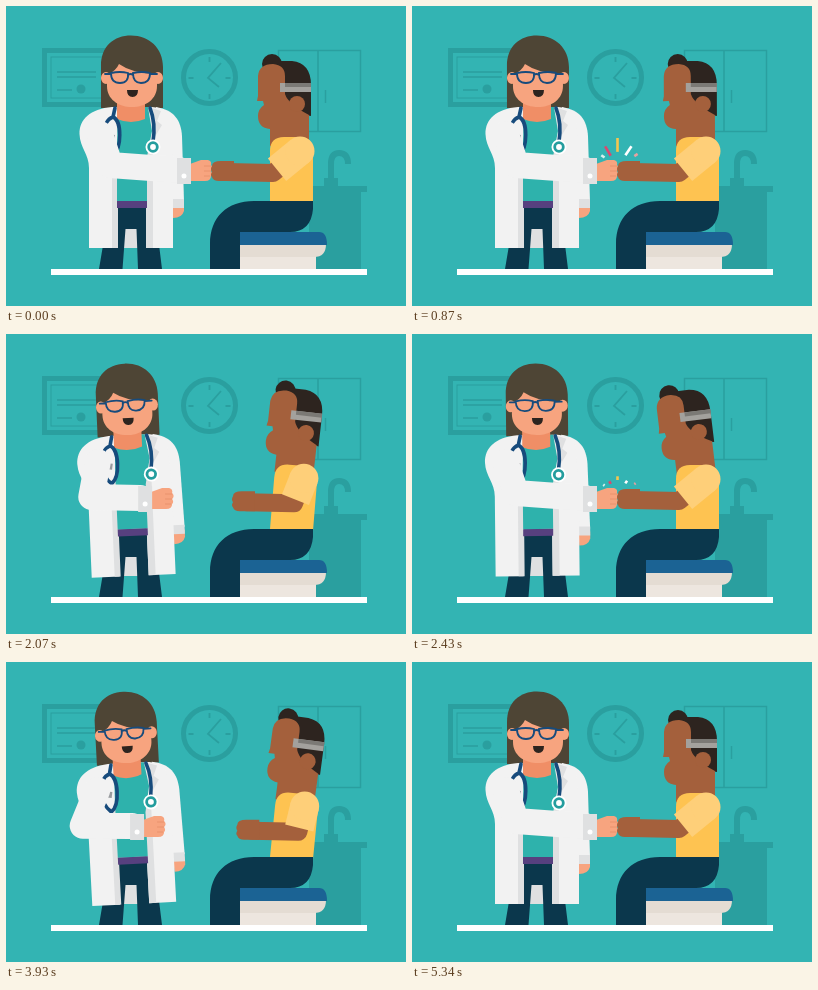
Write an HTML page that moves like this. It is 400 by 300 pixels and loops after 5.4 s.

```html
<!DOCTYPE html>
<html lang="en">
<head>
<meta charset="utf-8">
<title>Fist bump</title>
<style>
html, body { margin: 0; width: 100%; height: 100%; overflow: hidden; background: #33b4b3; }
svg { display: block; width: 100%; height: 100%; }
.line { fill: none; stroke: #2a9f9f; }
.wall { fill: #2a9f9f; }
.coat { fill: #f2f2f2; }
.shade { fill: #dfe0e1; }
.hair { fill: #4e4535; }
.peach { fill: #f7a47f; }
.navy { fill: #0b374c; }
.tube { fill: none; stroke: #174b7c; stroke-linecap: round; }
.brown { fill: #a4603c; }
.dark { fill: #2d241f; }
.limb { fill: none; stroke-linecap: round; stroke-linejoin: round; }
.cut { stroke-linecap: butt; }
</style>
</head>
<body>
<svg viewBox="0 0 400 300">
  <rect width="400" height="300" fill="#33b4b3"/>

  <!-- wall and counter -->
  <g class="line">
    <rect x="38.500" y="44.500" width="65" height="54" stroke-width="5"/>
    <rect x="45" y="51" width="52" height="41" stroke-width="1"/>
    <path d="M51 66H90M51 71H90M51 84H66" stroke-width="1.500"/>
    <circle cx="203.500" cy="71.500" r="26" stroke-width="5"/>
    <path d="M203.500 51v5M203.500 88v5M182.500 72h5M219.500 72h5M215 57L202 72L213 81" stroke-width="1.800"/>
    <path d="M272.500 44.500H354.500V125.500H272.500zM312 44V126M319.500 84v13" stroke-width="1.500"/>
    <path d="M325 180V158Q325 147 333 147Q342 147 342 158" stroke-width="6"/>
  </g>
  <g class="wall">
    <circle cx="75" cy="83" r="4.500"/>
    <path d="M303 180H361V186H355V263H303zM318 172h14v9h-14z"/>
  </g>

  <!-- doctor -->
  <path class="shade" d="M106 215H150V242H106z"/>
  <path class="navy" d="M104 198H148L156 263H132L130.500 223H119.500L116.500 263H93z"/>
  <g id="doctor">
    <path class="hair" d="M95 102V60C95 40 108 29.500 125 29.500C143 29.500 157 42 157 61V102z"/>
    <path class="peach" d="M166 198H178V205Q176 212 167 212z"/>
    <path class="coat" d="M150 101C168 104 175 114 176 130L178 195H162L150 150z"/>
    <path class="shade" d="M166 193H178V202H166z"/>
    <path class="coat" d="M106 101C84 103 73.500 113 73.500 128C74 142 83 148 83 162V242H111V195H140V242H167V150L164 112Q158 101 146 101z"/>
    <path class="shade" d="M106 145H112V242H106zM140 145H147V242H140zM143 101L155 105L151 115L156 119L147 134z"/>
    <path fill="#2eb2ac" d="M112 101H142L146 125L141 151V195H111V140z"/>
    <path fill="#57407f" d="M111 195H141V202H111z"/>
    <path fill="#f08e66" d="M111 92H139V113Q125 119 111 113z"/>
    <g id="doctorHead">
      <ellipse class="peach" cx="100" cy="72" rx="5" ry="6"/>
      <ellipse class="peach" cx="152" cy="72" rx="5" ry="6"/>
      <path class="peach" d="M101 69Q110 65 113 58Q127 68 151 68V80C151 93 140 101 126 101C112 101 101 93 101 80z"/>
      <path class="tube" stroke-width="1.800" d="M99 68H105M144 68H151M122 69Q124.500 67 127 69M105 67Q114 65 122 67Q123 77 114 77Q105 77 105 67zM127 67Q136 65 144 67Q144 77 135 77Q127 77 127 67z"/>
      <path class="dark" d="M121 84H132Q132 91 126.500 91Q121 91 121 84z"/>
    </g>
    <path class="tube" stroke-width="3.600" d="M109 102L107 111M107 111C95 115 95 139 107 149C116 142 116 115 107 111M144 102Q150 117 147 136"/>
    <path d="M101 128L109 129L108 135L101 134z" fill="#989b9e"/>
    <circle cx="147" cy="141" r="7.500" fill="#fff"/>
    <circle cx="147" cy="141" r="4.300" fill="#fff" stroke="#249d9e" stroke-width="2.800"/>
  </g>
  <path id="doctorArm" class="limb" stroke="#f2f2f2" stroke-width="26"/>
  <g id="doctorFist">
    <path class="peach" d="M184 158L195 154H202Q206 155 205 159Q208 162 205 165Q207 168 205 170Q205 175 199 175H184z"/>
    <path d="M198 160h7M198 165h7M198 170h6" stroke="#e48d69" stroke-width=".8"/>
    <path class="shade" d="M171 152H185V178H171z"/>
    <circle cx="178" cy="170" r="2.500" fill="#fff"/>
  </g>

  <!-- stool and patient -->
  <path fill="#ede6df" d="M234 250H310V263H234z"/>
  <path fill="#e4dcd3" d="M234 238H320Q320 251 308 251H234z"/>
  <path fill="#1b6394" d="M234 226H313Q321 226 321 239H234z"/>
  <g id="patient">
    <g id="patientHead">
      <circle class="dark" cx="266" cy="58" r="10"/>
      <path class="dark" d="M266 55H286Q305 57 305 79V110L290 107H276z"/>
      <path class="brown" d="M252 70Q253 58 267 58Q279 59 279 70V88Q282 98 303 109V140H264V123Q252 122 252 110Q252 103 258 99L257 95H251L252 90z"/>
      <circle class="brown" cx="291" cy="98" r="8"/>
      <path d="M274 77H305V86H274z" fill="#a3a19d"/>
      <path d="M279 77H305V81H279z" fill="#7b7975"/>
    </g>
    <path fill="#fec351" d="M264 200V145Q264 131 278 131H294Q307 131 307 145V200z"/>
  </g>
  <path class="navy" d="M307 195V203Q305 226 284 226H234V263H204V238C204 211 221 195 248 195z"/>
  <path id="patientArm" class="limb" stroke="#a4603c" stroke-width="18"/>
  <path id="sleeve" class="limb cut" stroke="#fecf79" stroke-width="29"/>
  <circle id="shoulder" r="14.500" fill="#fecf79"/>
  <path id="patientFist" class="brown" d="M228 155H215Q206 155 206 160Q204 163 206 166Q204 169 206 171Q207 175 213 175H228z"/>

  <path fill="#fff" d="M45 263H361V269H45z"/>
  <g id="sparks" class="limb cut" stroke-width="2.600"></g>
</svg>
<script>
const CYCLE = 1800;
const el = id => document.getElementById(id);
const set = (id, name, value) => el(id).setAttribute(name, value);
const smooth = u => u * u * (3 - 2 * u);
const mix = (a, b, u) => a + (b - a) * u;
const clamp = u => Math.max(0, Math.min(1, u));

// Eased value through [time, value] keys.
function track(keys, t) {
  for (let i = 1; i < keys.length; i++) {
    const [t0, a] = keys[i - 1], [t1, b] = keys[i];
    if (t < t1) return mix(a, b, smooth((t - t0) / (t1 - t0)));
  }
  return keys[keys.length - 1][1];
}

// Wind up slowly, then punch with acceleration.
function pullBack(t) {
  if (t < 390) return smooth(t / 390);
  return t < 600 ? 1 - ((t - 390) / 210) ** 3 : 0;
}

// Angle from vertical, inner and outer radius, colour.
const rays = [
  [-54, 17, 20, '#d9efed'],
  [-31, 14, 24, '#d84a70'],
  [0, 16, 29, '#f5c64e'],
  [34, 15, 25, '#ffffff'],
  [57, 21, 24, '#e6a2a0']
];
const sparkLines = rays.map(ray => {
  const path = document.createElementNS('http://www.w3.org/2000/svg', 'path');
  path.setAttribute('stroke', ray[3]);
  el('sparks').append(path);
  return path;
});

function drawSparks(t) {
  const u = (t - 600) / 510;
  el('sparks').style.display = u > 0 && u < 1 ? '' : 'none';
  const head = 1 - (1 - clamp(u / .55)) ** 2;
  const tail = smooth(clamp((u - .5) / .5));
  rays.forEach(([degrees, inner, outer], i) => {
    const angle = degrees * Math.PI / 180;
    const point = r => `${205.5 + r * Math.sin(angle)} ${161 - r * Math.cos(angle)}`;
    const far = mix(inner, outer, head);
    const near = mix(inner - 1, far, tail);
    sparkLines[i].setAttribute('d', `M${point(near)}L${point(far)}`);
  });
}

function draw(now) {
  const t = now % CYCLE;
  const pull = pullBack(t);
  const lean = track([[0, 0], [390, -3.2], [630, -.6], [900, 0]], t);
  const nod = track([[0, 0], [360, 2], [615, -7], [900, 0]], t);

  set('doctor', 'transform', `rotate(${lean} 125 180)`);
  set('doctorHead', 'transform', `rotate(${lean * .3} 125 100)`);
  const back = 50 * pull;
  set('doctorArm', 'd', `M${94 + lean * .9} 128L${104 - 31 * pull * pull} ${159 + 5 * pull}L${173 - back} 164`);
  set('doctorFist', 'transform', `translate(${-back})`);

  set('patient', 'transform', `rotate(${pull * 6} 285 196)`);
  set('patientHead', 'transform', `rotate(${nod} 288 132)`);
  const away = 27 * pull;
  const drop = 3 * pull;
  const shoulder = [294 + pull * 5, 145 - pull];
  const elbow = [267 + away, 167 + drop];
  set('patientArm', 'd', `M${shoulder}L${elbow}L${220 + away} ${166 + drop}`);
  set('sleeve', 'd', `M${shoulder}L${shoulder.map((s, i) => mix(s, elbow[i], .85))}`);
  set('shoulder', 'cx', shoulder[0]);
  set('shoulder', 'cy', shoulder[1]);
  set('patientFist', 'transform', `translate(${away} ${drop})`);

  drawSparks(t);
}

function frame() {
  draw(performance.now());
  requestAnimationFrame(frame);
}
frame();
</script>
</body>
</html>
```
